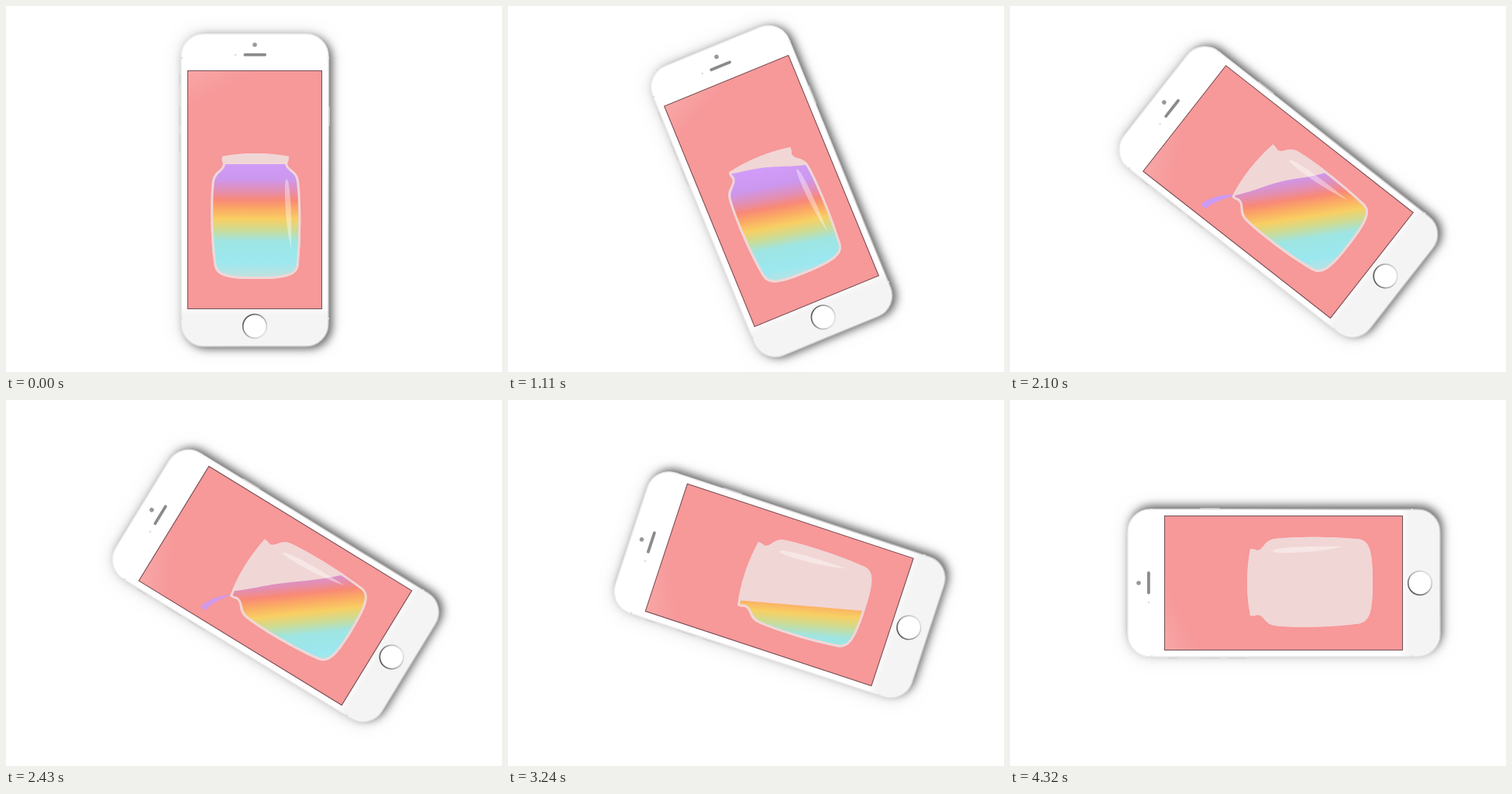
An HTML page with a canvas for the animation above (5.7 s loop, 640x472 px).

```html
<!DOCTYPE html>
<html lang="en">
<head>
<meta charset="utf-8">
<title>Pouring jar</title>
<style>
  html, body { margin: 0; width: 100%; height: 100%; overflow: hidden; background: #fff; }
  canvas { display: block; }
</style>
</head>
<body>
<canvas id="stage" width="640" height="472"></canvas>
<script>
const ctx = document.getElementById('stage').getContext('2d');
const LOOP = 5700, STEP = 30, MOVE_END = 4320;
const GLASS = '#f1d6d6', PINK = '#f79899', PURPLE = '#cc9af2';
const rad = degrees => degrees * Math.PI / 180;
const clamp01 = v => Math.max(0, Math.min(1, v));

// time, phone angle, phone x, phone y, liquid level, liquid slope, rainbow y, rainbow slope, ripple
const KEYS = [
  [0,     0,   321,   237,   204,   0, 250,   0, 0],
  [570,   7,   337,   237.8, 206,  -6, 252,  -6, 0.5],
  [1110, 22.3, 340,   238.5, 207,  -7, 257, -11, 1.5],
  [1800, 45.7, 344,   239.5, 216, -13, 251, -11, 1.5],
  [2100, 51.9, 346,   239.7, 222, -14, 248,  -9, 1.5],
  [2430, 58.5, 347.5, 239.5, 234,  -8, 250,  -6, 0.7],
  [2790, 64.4, 348.8, 239,   246,  -3, 252,  -3, 0],
  [3720, 79.7, 351.5, 237.5, 285,  10, 249,  10, 0],
  [4320, 90,   353,   236,   300,   4, 249,   4, 0]
];

const RAINBOW = [
  [-50, '#d09cf8'], [-27, '#cc97ee'], [-11, '#e48eb0'], [0, '#f88976'], [12, '#fbab64'],
  [25, '#f8cf63'], [38, '#cfdb91'], [53, '#9ee5e3'], [80, '#9be8f0'], [100, '#c2e0de']
];

const jar = new Path2D(`M-42 -43 Q0 -51 44 -43 Q44 -38 42 -34
  C43 -25 55 -26 57 -11 C60 12 60 62 57 92 C57 110 46 115 1 115
  C-42 115 -52 110 -53 92 C-57 62 -58 12 -55 -11 C-53 -25 -41 -25 -41 -34 Q-43 -38 -42 -43Z`);
const shine = new Path2D('M40 -13C44 -19 48 10 47 76C40 50 37 -3 40 -13Z');
const splash = new Path2D('M-38 -43Q-54 -63 -74 -69L-76 -61Q-58 -56 -38 -41Z');
const body = new Path2D();
body.roundRect(-95, -201, 190, 403, 29);

// Monotone cubic interpolation of one column of KEYS.
function track(t, col) {
  const last = KEYS.length - 1;
  const slope = i => (KEYS[i + 1][col] - KEYS[i][col]) / (KEYS[i + 1][0] - KEYS[i][0]);
  const tangent = i => {
    if (i === 0) return slope(0);
    if (i === last) return slope(last - 1);
    const a = slope(i - 1), b = slope(i);
    return a * b > 0 ? 2 * a * b / (a + b) : 0;
  };
  let i = 0;
  while (i < last - 1 && t >= KEYS[i + 1][0]) i++;
  const span = KEYS[i + 1][0] - KEYS[i][0], u = (t - KEYS[i][0]) / span;
  const from = KEYS[i][col], to = KEYS[i + 1][col];
  const ease = u * u * (3 - 2 * u);
  return from + (to - from) * ease +
    span * u * (1 - u) * ((1 - u) * tangent(i) - u * tangent(i + 1));
}

function pose(t) {
  const [angle, x, y, level, slope, bandY, bandSlope, ripple] =
    KEYS[0].slice(1).map((_, i) => track(t, i + 1));
  return { angle: rad(angle), x, y, level, slope: rad(slope), bandY, bandSlope: rad(bandSlope), ripple };
}

function toPhone(p) {
  ctx.setTransform(1, 0, 0, 1, p.x, p.y);
  ctx.rotate(-p.angle);
}

function gradient(x0, y0, x1, y1, stops) {
  const g = ctx.createLinearGradient(x0, y0, x1, y1);
  stops.forEach(([at, color]) => g.addColorStop(at, color));
  return g;
}

function disc(x, y, r, color) {
  ctx.fillStyle = color;
  ctx.beginPath();
  ctx.arc(x, y, r, 0, 7);
  ctx.fill();
}

function bar(x, y, w, h, color) {
  ctx.fillStyle = color;
  ctx.beginPath();
  ctx.roundRect(x, y, w, h, Math.min(w, h) / 2);
  ctx.fill();
}

// Canvas shadows ignore the transform, so their offset is turned with the phone.
function castShadow(p, dx, dy, blur, alpha) {
  const c = Math.cos(p.angle), s = Math.sin(p.angle);
  ctx.save();
  ctx.shadowColor = `rgba(0,0,0,${alpha})`;
  ctx.shadowBlur = blur;
  ctx.shadowOffsetX = dx * c + dy * s;
  ctx.shadowOffsetY = dy * c - dx * s;
  ctx.fillStyle = '#fff';
  ctx.fill(body);
  ctx.restore();
}

function drawPhone(p) {
  castShadow(p, 0, 0, 20, 0.16);
  castShadow(p, 5, 3, 11, 0.55);
  [[-150, 14], [-108, 26], [-73, 26]].forEach(([y, h]) => bar(-97.5, y, 4, h, '#d3d3d3'));
  bar(94, -108, 3, 26, '#bbb');
  ctx.fillStyle = gradient(0, 148, 0, 162, [[0, '#fff'], [1, '#f4f4f4']]);
  ctx.fill(body);
  ctx.lineWidth = 1.5;
  ctx.strokeStyle = gradient(-95, -80, 95, 80, [[0, '#ececec'], [0.6, '#e6e6e6'], [1, '#c4c4c4']]);
  ctx.stroke(body);
  [-171, 165].forEach(y => {
    bar(-96, y, 3, 2, '#ddd');
    bar(93, y, 3, 2, '#eee');
  });
  disc(0, -187, 2.8, '#999');
  disc(-25, -174, 1.3, '#ddd');
  bar(-14.5, -176, 29.5, 3.8, '#8b8b8b');
  disc(0, 176, 15.5, '#fff');
  ctx.lineWidth = 1.7;
  ctx.strokeStyle = gradient(-12, 165, 12, 187, [[0, '#555'], [0.5, '#aaa'], [1, '#e2e2e2']]);
  ctx.beginPath();
  ctx.arc(0, 176, 15.3, 0, 7);
  ctx.stroke();
}

function drawLiquid(p) {
  const cx = p.x + 1.5 * Math.cos(p.angle) + 34 * Math.sin(p.angle);
  const nx = -Math.sin(p.bandSlope), ny = Math.cos(p.bandSlope);
  const stops = RAINBOW.map(([d, color]) => [(d + 50) / 150, color]);
  ctx.setTransform(1, 0, 0, 1, 0, 0);
  ctx.fillStyle = gradient(cx - 50 * nx, p.bandY - 50 * ny, cx + 100 * nx, p.bandY + 100 * ny, stops);
  ctx.beginPath();
  ctx.moveTo(cx - 130, 472);
  for (let dx = -130; dx <= 130; dx += 5) {
    ctx.lineTo(cx + dx, p.level + dx * Math.tan(p.slope) + p.ripple * Math.sin(dx / 16));
  }
  ctx.lineTo(cx + 130, 472);
  ctx.fill();
  toPhone(p);
}

function drawJar(p, t) {
  ctx.save();
  ctx.fillStyle = GLASS;
  ctx.fill(jar);
  ctx.clip(jar);
  if (t < 4260) drawLiquid(p);
  ctx.strokeStyle = GLASS;
  ctx.lineWidth = 6;
  ctx.stroke(jar);
  ctx.fillStyle = 'rgba(255,255,255,.38)';
  ctx.fill(shine);
  ctx.restore();
}

function drawPour(t) {
  const grow = clamp01((t - 1890) / 210), fade = clamp01((t - 2350) / 440);
  if (grow > 0 && t < 2850) {
    const [px, py] = fade ? [-66, -63] : [-38, -42];
    const size = fade ? 1 - 0.6 * fade : grow;
    ctx.save();
    ctx.globalAlpha = 1 - 0.55 * fade;
    ctx.translate(px, py);
    ctx.scale(size, size);
    ctx.translate(-px, -py);
    ctx.fillStyle = PURPLE;
    ctx.fill(splash);
    ctx.restore();
  }
  if (t >= 3500 && t < 3960) {
    ctx.strokeStyle = 'rgba(225,195,180,.65)';
    ctx.lineWidth = 1;
    ctx.beginPath();
    ctx.moveTo(-48, -46);
    ctx.lineTo(-75, -47);
    ctx.stroke();
  }
}

function drawScreen(p, t) {
  ctx.save();
  ctx.beginPath();
  ctx.rect(-87, -154, 174, 308);
  ctx.fillStyle = PINK;
  ctx.fill();
  ctx.clip();
  ctx.fillStyle = gradient(-87, -154, -68, -115, [[0, 'rgba(255,255,255,.14)'], [1, 'rgba(255,255,255,0)']]);
  ctx.fillRect(-87, -154, 174, 308);
  drawPour(t);
  drawJar(p, t);
  ctx.restore();
  ctx.strokeStyle = '#6e5054';
  ctx.lineWidth = 1;
  ctx.strokeRect(-86.5, -153.5, 173, 307);
}

function frame(now) {
  const t = Math.min(MOVE_END, Math.floor(now % LOOP / STEP) * STEP);
  const p = pose(t);
  ctx.setTransform(1, 0, 0, 1, 0, 0);
  ctx.fillStyle = '#fff';
  ctx.fillRect(0, 0, 640, 472);
  toPhone(p);
  drawPhone(p);
  drawScreen(p, t);
}

const start = performance.now();
function tick() {
  frame(performance.now() - start);
  requestAnimationFrame(tick);
}
tick();
</script>
</body>
</html>
```
